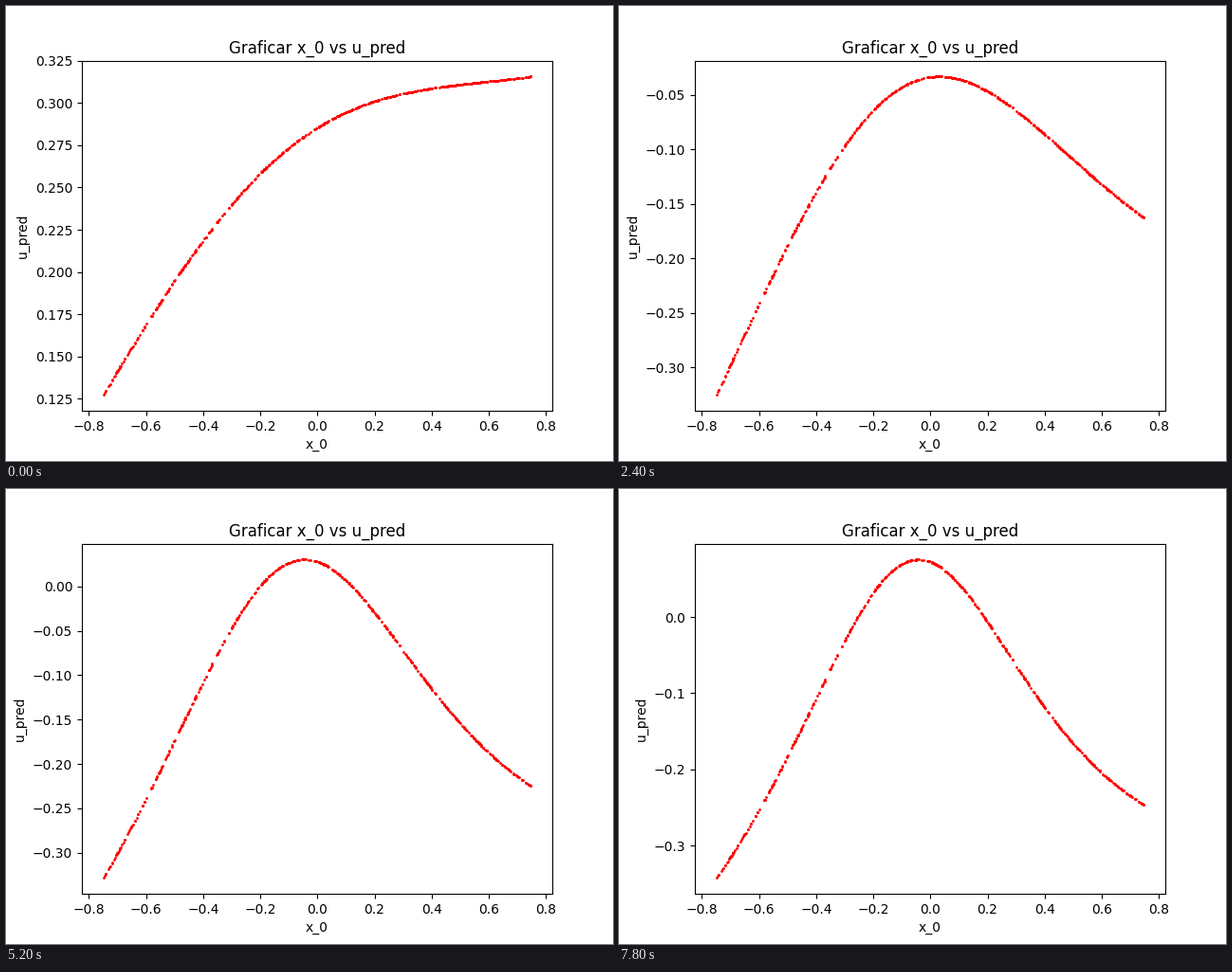
Recreate the animation shown at these times as a matplotlib script. Size 640 by 480 pixels, loop 8000 ms.

```python
import numpy as np
import matplotlib.pyplot as plt
from matplotlib.animation import FuncAnimation

FRAMES, STEP = 40, 200
X_MIN, X_MAX, COUNT = -0.7497, 0.7478, 500
ANCHORS = np.array([-0.75, 0, 0.75])

# frame, heights at the three anchors, bump centre, bump width
POSES = np.array([
    (0, 0.1270, 0.2855, 0.3158, -0.16, 1.30),
    (3, 0.6394, 1.1200, 1.1985, -0.24, 1.40),
    (9, -0.3307, -0.0512, -0.0953, -0.11, 1.20),
    (16, -0.3180, 0.0002, -0.2033, -0.11, 0.80),
    (30, -0.3342, 0.0388, -0.2319, -0.083, 0.64),
    (39, -0.3428, 0.0724, -0.2470, -0.07, 0.58),
])
TIMES, STATES = POSES[:, 0], POSES[:, 1:]


def monotone_slopes(t, v):
    sec = np.diff(v, axis=0) / np.diff(t)[:, None]
    a, b = sec[:-1], sec[1:]
    same = a * b > 0
    inner = np.where(same, 2 * a * b / np.where(same, a + b, 1), 0)
    return np.vstack([sec[:1], inner, sec[-1:]])


SLOPES = monotone_slopes(TIMES, STATES)


def state_at(i):
    """Cubic Hermite blend of the neighbouring poses."""
    k = min(np.searchsorted(TIMES, i, side="right") - 1, len(TIMES) - 2)
    h = TIMES[k + 1] - TIMES[k]
    s = (i - TIMES[k]) / h
    return ((1 + 2 * s) * (1 - s) ** 2 * STATES[k]
            + s * (1 - s) ** 2 * h * SLOPES[k]
            + s * s * (3 - 2 * s) * STATES[k + 1]
            + s * s * (s - 1) * h * SLOPES[k + 1])


def basis(x, centre, width):
    bump = 1 / (1 + ((x - centre) / width) ** 2)
    return np.column_stack([np.ones_like(x), x, bump])


def predict(x, i):
    """Straight line plus a bump, passing through the anchor heights."""
    *heights, centre, width = state_at(i)
    weights = np.linalg.solve(basis(ANCHORS, centre, width), heights)
    return basis(x, centre, width) @ weights


def draw(i):
    ax.clear()
    ax.plot(xs, predict(xs, i), "ro", markersize=1)
    ax.set_title("Graficar x_0 vs u_pred")
    ax.set_xlabel("x_0")
    ax.set_ylabel("u_pred")


rng = np.random.default_rng(7)
xs = np.append(rng.uniform(X_MIN, X_MAX, COUNT), (X_MIN, X_MAX))

plt.rcParams["font.family"] = "DejaVu Sans"
fig, ax = plt.subplots(figsize=(6.4, 4.8), dpi=100)
anim = FuncAnimation(fig, draw, frames=FRAMES, interval=STEP,
                     init_func=lambda: draw(0), repeat=True, repeat_delay=0)
plt.show()
```
